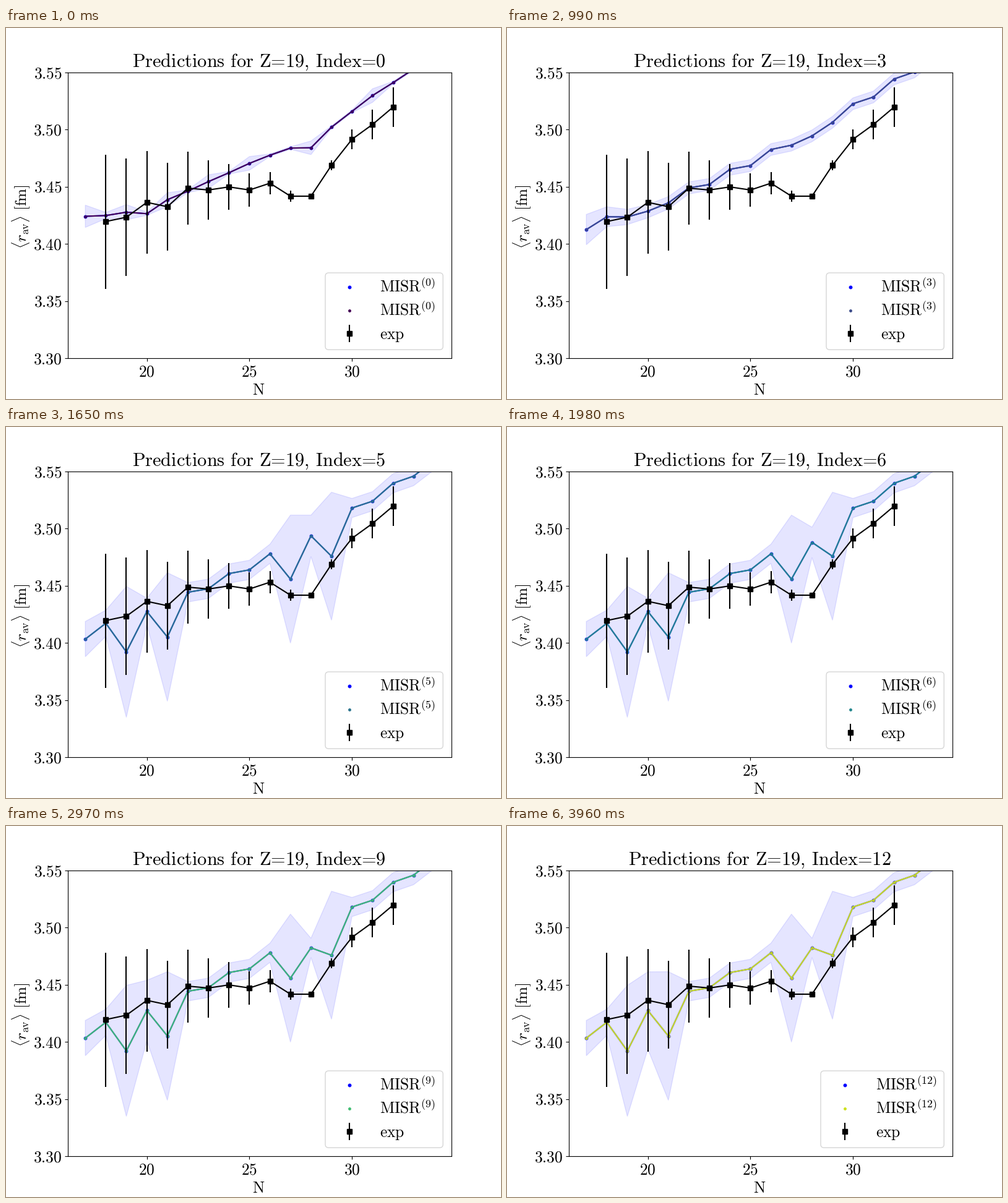
Recreate the animation shown at these times as a matplotlib script. Size 800 by 600 pixels, loop 4290 ms.

```python
import numpy as np
import matplotlib.pyplot as plt
from matplotlib.animation import FuncAnimation
from matplotlib.patches import FancyBboxPatch

plt.rcParams["mathtext.fontset"] = "cm"
COUNT, STEP = 13, 330
TEXT = 18.4
BLUE = "#0000ff"
SCALE = 1848  # stage pixels per fm

N = np.arange(17, 35)
START = np.exp((17 - N) / 1.2)
JUMP = np.isin(N, [19, 21, 27, 29])
GAP = np.isin(N, [20, 28])

# Curve heights in stage pixels
CALM = np.array([316, 300, 302.5, 294, 281, 257, 251.5, 227, 221,
                 195, 188, 173, 151, 121, 110, 81, 69.5, 44])
MEASURED = np.array([313, 306, 282, 289, 259, 262, 257, 262,
                     251, 272, 272, 222, 180, 156, 128])


def fm(px):
    return 3.30 + (534 - px) / SCALE


def run_at(i):
    """Model curve and half width of its band."""
    early = max(0, 1 - i / 2)
    calmed = np.interp(i, [5, 7], [0, 1])

    # Odd-even staggering fades, then the start of the chain sinks
    stagger = np.where(N % 2, -3, 7) + 14 * np.exp(-((N - 28.3) / 2) ** 2)
    mid = CALM + early * stagger
    mid += 17 * START * np.interp(i, [0, 2, 4], [-0.5, 0, 1])
    mid += np.interp(i, [2, 4], [0, 3])

    wide = np.isin(N, [17, 19, 21, 23, 25, 28, 31])
    half = (1 - early) * (9.5 + 15 * START) + early * (2 + 9 * wide + 7 * START)

    # From here on a few isotopes jump and spread
    if i >= 5:
        mid += np.where(JUMP, 55, np.where(GAP, 0, 7)) + 21 * calmed * (N == 28)
        half = 15.5 + 13 * START + 88 * JUMP
        half += 18 * (1 - calmed) * (N == 28)
        half += np.interp(i, [7, 10], [5, 46]) * (N == 20)
    return fm(mid), half / SCALE


fig = plt.figure(figsize=(8, 6), dpi=100, facecolor="white")
ax = fig.add_axes([0.125, 0.11, 0.775, 0.77])
ax.set(xlim=(16.15, 34.85), ylim=(3.30, 3.55),
       xticks=[20, 25, 30], yticks=np.linspace(3.30, 3.55, 6))
ax.tick_params(labelbottom=False, labelleft=False)

# Transparent layer in stage pixels for lettering and legend
top = fig.add_axes([0, 0, 1, 1])
top.set(xlim=(0, 800), ylim=(600, 0))
top.axis("off")


def words(s):
    """Upright Computer Modern with plain text spacing."""
    s = s.replace(",", "{,}").replace("=", r"\hspace{-0.2}=\hspace{-0.2}")
    return r"$\mathrm{" + s.replace(" ", r"\hspace{0.38}") + "}$"


def put(x, y, s, size=TEXT, **kw):
    return top.text(x, y, s, fontsize=size, va="baseline", **kw)


for k in range(6):
    put(90.5, 543 - 92.4 * k, words(f"{3.30 + 0.05 * k:.2f}"), ha="right")
for n in (20, 25, 30):
    put(100 + (n - 16.15) * 620 / 18.7, 563, words(str(n)), ha="center")
put(408, 593, words("N"), ha="center")
put(34.5, 305.5, r"$\langle r_{\mathrm{av}}\rangle\hspace{0.36}\mathrm{[fm]}$", 18,
    ha="center", rotation=90, rotation_mode="anchor")
title = put(408.5, 63, "", 21.85, ha="center")

# Model runs: a blue curve with a slightly smaller coloured one on top
shade, = ax.fill([17, 18, 18], [3.4, 3.4, 3.4], color=BLUE, alpha=0.1, lw=1, zorder=1)
SIZES = (3.2, 2.5)


def dot(axes, size, **kw):
    return axes.plot([], [], "o", color=BLUE, ms=size, mew=1, **kw)[0]


dots = [dot(ax, size, zorder=1.5) for size in SIZES]
lines = [ax.plot([], [], color=BLUE, lw=1.5, zorder=2)[0] for _ in SIZES]

# Measurements, least certain far from N = 28
away = N[1:16] - 28
error = 8.35 * abs(away) + np.where(away < 0, 0.25, -0.1) * away ** 2
ax.errorbar(N[1:16], fm(MEASURED), yerr=error / SCALE, fmt="-s", color="black",
            ms=6, lw=1.5, elinewidth=1.5, zorder=3)

# Legend
frame = FancyBboxPatch((516, 396), 190, 124, boxstyle="round,pad=0,rounding_size=5.5",
                       fc="white", ec="0.8", lw=1, alpha=0.8)
top.add_patch(frame)
marks = [dot(top, size) for size in SIZES]
square, = top.plot([], [], "s", color="black", ms=6)
stem, = top.plot([], [], color="black", lw=1.5, solid_capstyle="butt")
names = [put(0, y, "") for y in (426.5, 464.5)]
exp_name = put(0, 503.5, words("exp"))


def draw(i):
    mid, half = run_at(i)
    color = plt.get_cmap("viridis")(i / COUNT)
    edge = np.r_[mid + half, (mid - half)[::-1]]
    shade.set_xy(np.column_stack([np.r_[N, N[::-1]], edge]))
    for curve in dots + lines:
        curve.set_data(N, mid)
    for part in (dots[1], lines[1], marks[1]):
        part.set_color(color)

    title.set_text(words(f"Predictions for Z=19, Index={i}"))
    left = 516 if i < 10 else 507
    frame.set_bounds(left, 396, 706.3 - left, 124.3)
    x = left + 39.3
    for mark, y in zip(marks, (419.4, 457.4)):
        mark.set_data([x], [y])
    square.set_data([x], [494.2])
    stem.set_data([x, x], [480.3, 508.1])
    for name in names:
        name.set_text(r"$\mathrm{MISR}^{(%d)}$" % i)
    for name in names + [exp_name]:
        name.set_x(left + 88.5)
    return []


anim = FuncAnimation(fig, draw, frames=COUNT, interval=STEP,
                     init_func=lambda: draw(0), repeat=True, repeat_delay=0)
plt.show()
```
